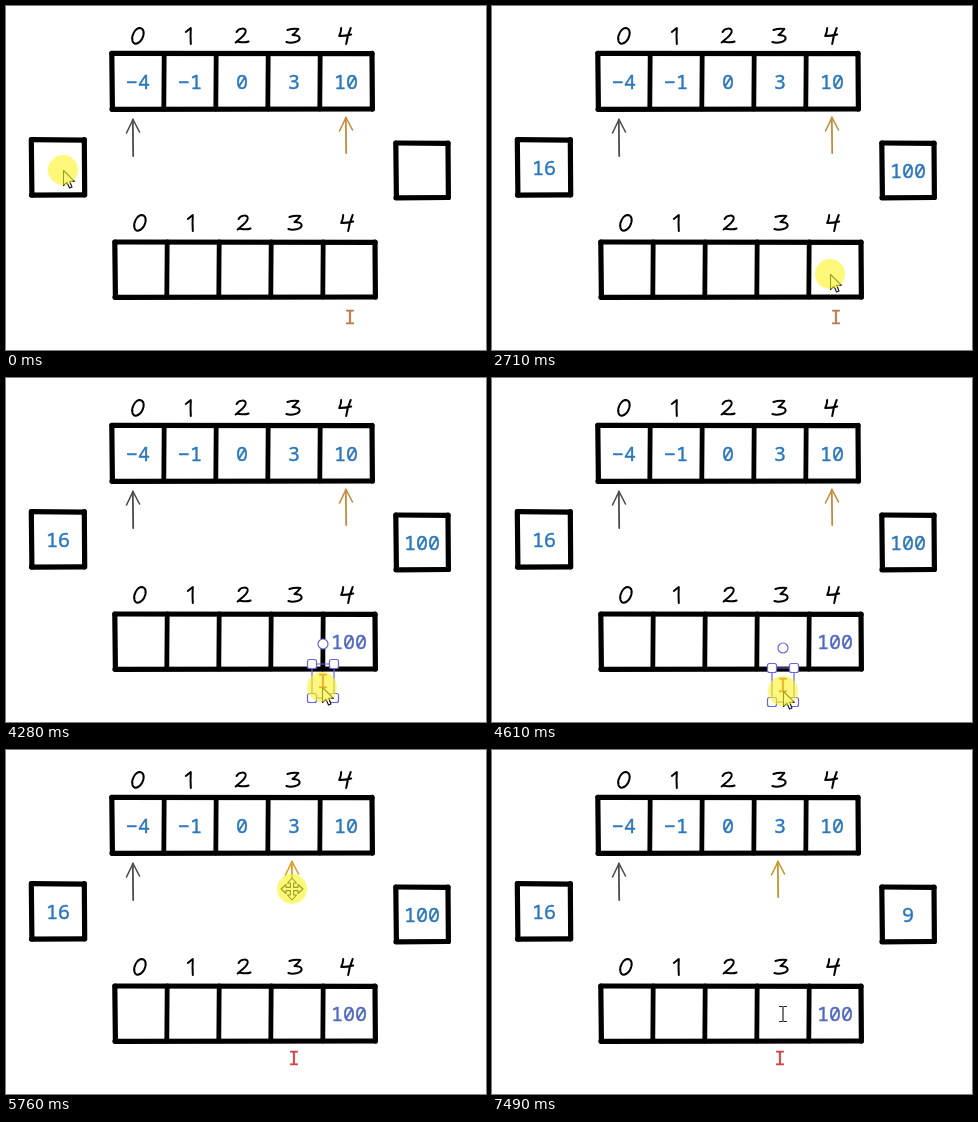
Recreate the animation shown at these times as an HTML page with a canvas. Size 480 by 344 pixels, loop 8 s.

```html
<!DOCTYPE html>
<html lang="en">
<head>
<meta charset="utf-8">
<title>Squares of a sorted array</title>
<style>
html, body { margin: 0; width: 100%; height: 100%; overflow: hidden; background: #fff; }
canvas { display: block; }
</style>
</head>
<body>
<canvas id="stage" width="480" height="344"></canvas>
<script>
const ctx = document.getElementById('stage').getContext('2d');
const LOOP = 8000;
const BLUE = '#2a77bd', VIOLET = '#6965db', MIXED = '#5068c2';
const MONO = '20px "Noto Sans Mono", monospace';

// Cell contents over time; a trailing bar is the text caret.
const leftText = [[0, ''], [70, '|'], [200, '16|'], [540, '16']];
const rightText = [[0, ''], [930, '|'], [1330, '1|'], [1660, '10|'], [1790, '100|'],
  [1920, '100'], [7080, '9|'], [7210, '9']];
const lastText = [[0, ''], [3130, '|'], [3400, '10|'], [3530, '100|'], [3800, '100']];
const nextText = [[0, ''], [7210, '|'], [7490, '']];

// time, kind, x, y, halo
const pointer = [
  [0, 'arrow', 57, 164, true], [70, 'beam', 57, 166], [540, 'none'],
  [600, 'arrow', 412, 172, true], [930, 'beam', 414, 173],
  [1920, 'arrow', 338, 268, true], [2120, 'arrow', 338, 268],
  [2710, 'arrow', 338, 268, true], [3060, 'beam', 340, 269],
  [3800, 'arrow', 343, 317, true], [4000, 'drag'],
  [4880, 'arrow', 291, 314], [4950, 'none'],
  [5150, 'move', 340, 139, true], [5350, 'move', 324, 139, true],
  [5420, 'move', 312, 139, true], [5490, 'move', 300, 139, true],
  [5560, 'move', 291, 139, true], [5630, 'move', 286, 139, true],
  [5770, 'arrow', 318, 146], [5840, 'arrow', 366, 157],
  [5910, 'arrow', 405, 165], [6030, 'arrow', 418, 167, true],
  [6290, 'beam', 420, 167], [7210, 'beam', 291, 264]
];
const arrowX = [[0, 340], [5350, 337], [5420, 324], [5490, 312], [5560, 300], [5630, 291], [5700, 286]];
const arrowColor = [[0, '#c68a3e'], [5350, '#e59a1c'], [5770, '#c2962a']];
const markPath = [[4000, 344, 311], [4070, 340, 309], [4280, 317, 303], [4490, 294, 306], [4630, 288, 308]];

function held(keys, t) {
  let found = keys[0];
  for (const key of keys) if (key[0] <= t) found = key;
  return found;
}

function along(keys, t) {
  if (t <= keys[0][0]) return keys[0].slice(1);
  for (let i = 1; i < keys.length; i++) {
    const [t1, x1, y1] = keys[i], [t0, x0, y0] = keys[i - 1];
    if (t < t1) {
      const k = (t - t0) / (t1 - t0);
      return [x0 + (x1 - x0) * k, y0 + (y1 - y0) * k];
    }
  }
  return keys[keys.length - 1].slice(1);
}

function line(color, width, ...pts) {
  ctx.strokeStyle = color;
  ctx.lineWidth = width;
  ctx.beginPath();
  for (let i = 0; i < pts.length; i += 2) ctx.lineTo(pts[i], pts[i + 1]);
  ctx.stroke();
}

function sketchBox(x0, y0, x1, y1) {
  line('#000', 5.2, x0, y0, x1, y0 + 0.4);
  line('#000', 5.2, x1, y0, x1 + 0.4, y1);
  line('#000', 5.2, x1, y1, x0, y1 + 0.3);
  line('#000', 5.2, x0 + 0.4, y1, x0 - 0.2, y0);
}

function row(x0, y0, x1, y1) {
  sketchBox(x0, y0, x1, y1);
  for (let i = 1; i < 5; i++) {
    const x = x0 + 52 * i;
    line('#000', 4.8, x + 0.2, y0, x - 0.2, y1);
  }
}

const digits = [
  'M2 -8C-3 -8 -7 0 -5.5 5C-4 9.5 1 8 4 3C7 -3 6 -8 1 -8',
  'M-4 -4L1 -8Q.5 0 1 8',
  'M-5 -4C-3 -8 5 -9 4 -4C3 0 -2 3 -6 6.5C-4 4 0 8 7 5.5',
  'M-6 -6Q0 -8 5 -7Q2 -3 -1 -1C8 -1 8 4 2 6Q-3 7.5 -7 6',
  'M-4 -8Q-4 -4 -6 0Q0 0 6 -1.5M5.5 -8Q2 0 1 8'
].map(d => new Path2D(d));

function indices(x, y) {
  ctx.strokeStyle = '#000';
  ctx.lineWidth = 2;
  digits.forEach((digit, i) => {
    ctx.save();
    ctx.translate(x + 51.8 * i, y);
    ctx.stroke(digit);
    ctx.restore();
  });
}

function label(text, x, y, color = BLUE, font = MONO) {
  ctx.font = font;
  ctx.fillStyle = ctx.strokeStyle = color;
  ctx.lineWidth = 0.4;
  ctx.fillText(text, x, y + 7);
  ctx.strokeText(text, x, y + 7);
}

function field(keys, t, x, y, color) {
  const value = held(keys, t)[1];
  const text = value.replace('|', '');
  label(text, x, y, color);
  if (text !== value) {
    ctx.fillStyle = BLUE;
    ctx.fillRect(x + text.length * 6 - 1, y - 12, 1, 24);
  }
}

function upArrow(x, top, bottom, color) {
  line(color, 1.8, x + 0.2, bottom, x - 0.2, top);
  line(color, 1.6, x - 6.5, top + 13.5, x, top, x + 6.5, top + 12.5);
}

function selection(x0, y0, x1, y1) {
  const mid = (x0 + x1) / 2;
  ctx.strokeStyle = VIOLET;
  ctx.fillStyle = '#fff';
  ctx.lineWidth = 1.2;
  ctx.strokeRect(x0, y0, x1 - x0, y1 - y0);
  for (const x of [x0, x1]) for (const y of [y0, y1]) {
    ctx.beginPath();
    ctx.roundRect(x - 4.5, y - 4.5, 9, 9, 2);
    ctx.fill();
    ctx.stroke();
  }
  ctx.beginPath();
  ctx.arc(mid, y0 - 20, 5, 0, 7);
  ctx.fill();
  ctx.stroke();
}

function halo(x, y) {
  ctx.fillStyle = 'rgba(253, 244, 40, 0.62)';
  ctx.beginPath();
  ctx.arc(x, y, 15, 0, 7);
  ctx.fill();
}

const arrowShape = new Path2D('M.5 .5V15.5L4 12.2L6.5 18L9 17L6.6 11.3H11.5Z');
const moveArm = [-1.6, -1.6, -1.6, -6, -4.5, -6, 0, -11, 4.5, -6, 1.6, -6, 1.6, -1.6];
const cursors = {
  arrow() {
    ctx.fillStyle = '#fff';
    ctx.strokeStyle = '#111';
    ctx.lineWidth = 1.1;
    ctx.fill(arrowShape);
    ctx.stroke(arrowShape);
  },
  beam() {
    line('#222', 1.2, 0, -7, 0, 7);
    for (const y of [-7.5, 7.5]) {
      line('#222', 1.1, -3.5, y, -0.8, y);
      line('#222', 1.1, 0.8, y, 3.5, y);
    }
  },
  move() {
    ctx.beginPath();
    for (let turn = 0; turn < 4; turn++) {
      for (let i = 0; i < moveArm.length; i += 2) ctx.lineTo(moveArm[i], moveArm[i + 1]);
      ctx.rotate(Math.PI / 2);
    }
    ctx.closePath();
    ctx.fillStyle = '#fff';
    ctx.strokeStyle = '#111';
    ctx.lineWidth = 1.1;
    ctx.fill();
    ctx.stroke();
  }
};

function drawCursor(kind, x, y) {
  ctx.save();
  ctx.translate(x, y);
  cursors[kind]();
  ctx.restore();
}

function draw(t) {
  ctx.fillStyle = '#fff';
  ctx.fillRect(0, 0, 480, 344);
  ctx.lineCap = ctx.lineJoin = 'round';
  ctx.textAlign = 'center';

  indices(132, 30);
  indices(134, 217);
  row(106, 47.3, 366, 103);
  row(109, 236, 369, 291);
  sketchBox(25.5, 133.7, 78.3, 188.8);
  sketchBox(390, 137, 442, 191.5);

  ['\u22124', '\u22121', '0', '3', '10'].forEach((n, i) => label(n, 132 + 52 * i, 75.5));
  field(leftText, t, 52, 162);
  field(rightText, t, 416, 165);
  field(lastText, t, 343, 264, t < 4000 ? BLUE : MIXED);
  field(nextText, t, 292, 264);

  if (t >= 6290 && t < 7080) {
    ctx.fillStyle = '#3367d1';
    ctx.fillRect(399, 153, 35, 24);
    label('100', 416.5, 165, '#fff', 'bold ' + MONO);
  }

  upArrow(127, 113.5, 150, '#4c4c4c');
  upArrow(held(arrowX, t)[1], 111.5, 147, held(arrowColor, t)[1]);

  // The drag advances in 70 ms ticks.
  const tick = 4000 + Math.floor((t - 4000) / 70) * 70;
  const [mx, my] = along(markPath, tick);
  label('I', mx, my, t < 4000 ? '#c17a4c' : '#d34343');

  let [, kind, x, y, glow] = held(pointer, t);
  if (kind === 'drag') {
    kind = 'arrow';
    x = Math.max(mx - 1, 291);
    y = my + 6;
    glow = true;
  }
  if (t >= 4000 && t < 5150) selection(mx - 11, my - 17, mx + 11, my + 17);
  if (t >= 6030 && t < 6290) selection(384, 131, 448, 198);
  if (kind !== 'none') drawCursor(kind, x, y);
  if (glow) halo(x, y);
}

const start = performance.now();
function frame() {
  draw((performance.now() - start) % LOOP);
  requestAnimationFrame(frame);
}
frame();
</script>
</body>
</html>
```
